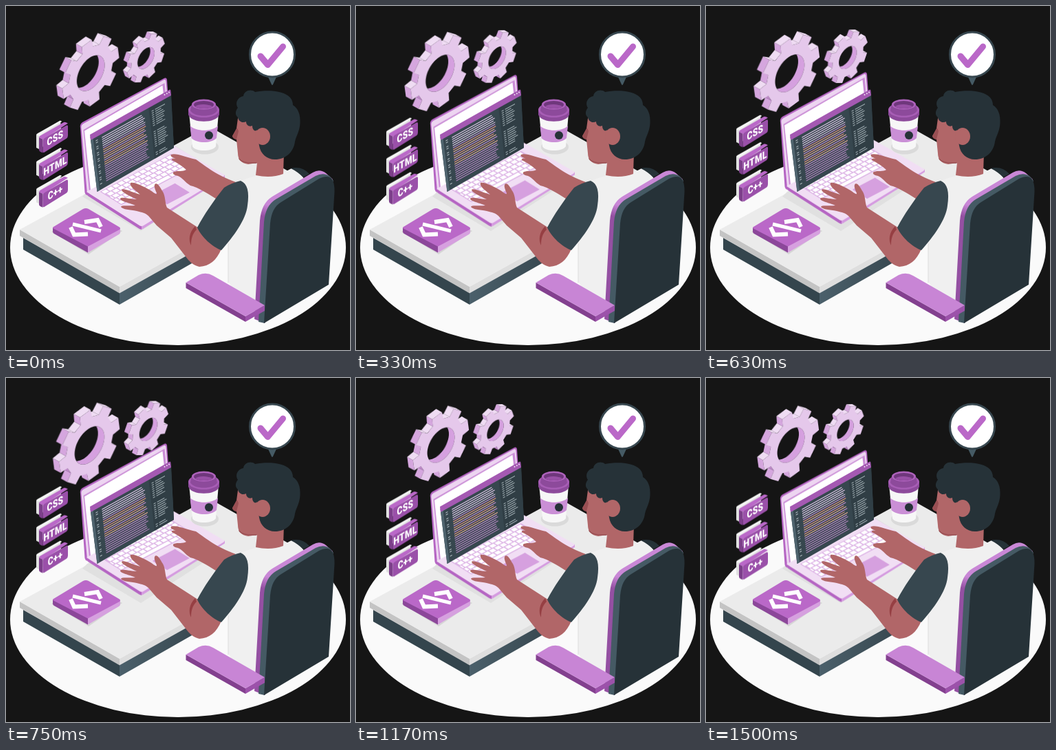
These frames come from a looping animation (500x500 px, 1.54 s). An HTML page:

```html
<!DOCTYPE html>
<html lang="en">
<head>
<meta charset="utf-8">
<title>Coding at a desk</title>
<style>
  html, body { margin: 0; width: 100%; height: 100%; overflow: hidden; background: #151515; }
  svg { display: block; width: 100%; height: 100%; }
  .float { animation: float 1540ms linear -40ms infinite; }
  .pulse { animation: pulse 1540ms linear -40ms infinite; transform-origin: 150px 92.5px; }
  @keyframes float {
    0%, 100% { transform: translateY(.5px); }
    50% { transform: translateY(-9.5px); }
  }
  @keyframes pulse {
    0%, 32.5%, 65%, 100% { transform: scale(1); }
    16.2%, 48.7% { transform: scale(1.1); }
  }
  .tag text { font: 900 14px Roboto, Arial, sans-serif; fill: #fff; text-anchor: middle; letter-spacing: .3px; }
  .skin { fill: #b16668; }
  .line { fill: none; stroke-linecap: round; stroke-linejoin: round; }
</style>
</head>
<body>
<svg viewBox="0 0 500 500">
  <defs>
    <linearGradient id="rim" gradientUnits="userSpaceOnUse" x1="372" y1="320" x2="390" y2="278">
      <stop offset=".3" stop-color="#9450a2"/><stop offset=".7" stop-color="#c987d6"/>
    </linearGradient>
    <linearGradient id="drawer" gradientUnits="userSpaceOnUse" x1="165" y1="0" x2="280" y2="0">
      <stop offset="0" stop-color="#4b606b"/><stop offset="1" stop-color="#37474f"/>
    </linearGradient>
    <g id="plate">
      <path fill="#e0e0e0" d="M44 188Q44 186 46 185L79 166.500L81 187L48 208L44 206Z"/>
      <path fill="#f5f5f5" d="M44 187L78 167Q80 166 81 168L48 189Z"/>
      <path fill="#7d3f8b" d="M48 191L53.500 193.500V213.500L50 212Q48 211 48 209Z"/>
      <path fill="#ba68c8" d="M48 191Q48 189.500 50 188.500L84 169Q86 168 90 170.500L54 194Z"/>
      <path fill="#9a50a9" d="M53.500 196Q53.500 193.500 56 192L87 174Q90 172 90 175V188Q90 191 88 192.500L56 212.500Q53.500 214 53.500 211Z"/>
    </g>
  </defs>

  <rect width="500" height="500" fill="#151515"/>
  <ellipse cx="250" cy="351" rx="244" ry="142" fill="#fafafa"/>

  <g id="gears" class="pulse"></g>

  <!-- desk -->
  <path fill="#34454d" d="M25 337L165 416V434L25 354Z"/>
  <path fill="url(#drawer)" d="M165 416L300 340V357L165 434Z"/>
  <path fill="#c4c4c4" d="M20 325L165 408V417.500L20 334Z"/>
  <path fill="#dedede" d="M165 408L300 333V342L165 417.500Z"/>
  <path fill="#ebebeb" d="M20 325L295 175L428 250L340 311L165 408Z"/>

  <!-- code block -->
  <path fill="#d6d6d6" d="M66 328L115 299L169 327L120 361Z"/>
  <path fill="#8c479a" d="M68 322L119 349V358.500L70 331Q68 330 68 328Z"/>
  <path fill="#d6a0df" d="M119 349L166 323V329Q166 331 164 332L119 358.500Z"/>
  <path fill="#ba68c8" d="M69 321L112 295Q116 293 120 295L165 321.500Q167 323 165 325L119 349.500L69 323.500Q67 322 69 321Z"/>
  <g class="line" stroke="#fff" stroke-width="6" style="stroke-linecap:butt;stroke-linejoin:miter">
    <path d="M114 314L133 311L138 321M119 331.500L99 332.500L94 321.500"/>
    <path d="M97 317L138 327" stroke-width="5"/>
  </g>

  <!-- laptop -->
  <path fill="#e0e0e0" d="M111 277L118 270L246 203L317 249L196 327Z"/>
  <g class="float">
    <path fill="#b565c3" d="M108 177Q107 172 111 169L229 105.500Q233 103 234 107L241 205L118 275Q115 274 114.500 271Z"/>
    <path fill="#edd5f1" d="M109.500 177Q109 173 112.500 171L229 107.500Q232 106 232.500 109L240 204L118 272Z"/>
    <path fill="#ca8cd6" d="M112.500 180L230.500 112L239 204L121 270Z"/>
    <path fill="#fff" d="M114 181.500L227.500 115.500L237 203L123 268Z"/>
    <path fill="#b565c3" d="M117 270L197 319V325L194 324L119 276Q117 274 117 270Z"/>
    <path fill="#d59be0" d="M197 319L318 245.500V249.500L199 324L197 325Z"/>
    <path fill="#f1def4" d="M117 270L241 204L244 203L316 244.500Q319 246 316 248L200 319Q197 321 194 319Z"/>
    <g id="deck" transform="matrix(1.26 -.67 .79 .49 118 270)">
      <path fill="#dcb2e5" d="M8 11H90V50H8Z"/>
      <path fill="#d6a0df" d="M37 61H63V88H37Z"/>
    </g>
  </g>

  <!-- editor window -->
  <path fill="#37474f" d="M122.500 190L239.500 125L244 206L132.500 270Z"/>
  <path fill="#303e45" d="M207 146L240 127L244 206L216 222Z"/>
  <path fill="#50656f" d="M123 194L126.500 192L136 268L132.500 270Z"/>
  <path fill="#a459b2" d="M122 187L237 122Q239.500 120.500 239.500 124L240 130L123 195Z"/>
  <g fill="#f3e3f6"><circle cx="230.500" cy="129" r="1"/><circle cx="233.800" cy="127.200" r="1"/><circle cx="237" cy="125.400" r="1"/></g>
  <g id="code" transform="matrix(1 -.556 .1 1 122 186)"></g>

  <!-- cup -->
  <ellipse cx="289" cy="205" rx="20" ry="10.500" fill="#dadada"/>
  <path fill="#f7f7f7" d="M266 155L271 204C275 212 300 212 305 204L309 155Z"/>
  <path fill="#ca8fd6" d="M267.500 174C276 183 300 183 308 174L306 192C298 200 278 200 269.500 192Z"/>
  <circle cx="295" cy="188" r="6" fill="#263238"/>
  <path fill="#8d4a9b" d="M265 150V158C269 171 306 171 310 158V150Z"/>
  <ellipse cx="287.500" cy="151" rx="22.500" ry="11" fill="#a75db5"/>
  <path fill="#8d4a9b" d="M270 143L268 152C273 162 302 162 307 152L305 143Z"/>
  <ellipse cx="287.500" cy="143" rx="17.500" ry="7.500" fill="#ae62bc"/>
  <ellipse cx="287.500" cy="143.500" rx="14.500" ry="5.500" fill="#6f377c"/>
  <path fill="#9850a6" d="M275 146C280 141 296 143 300 146C295 150 281 150 275 146Z"/>

  <!-- man -->
  <path class="skin" d="M240 216C246 213 262 220 276 223C288 231 302 244 334 256L320 266L305 280C292 272 280 264 268 261C260 256 257 250 250 247C244 246 241 243 244 241C250 239 257 241 262 238C255 232 249 228 241 224C240 222 243 221 247 222C243 220 238 219 240 216Z"/>
  <path fill="#f0f0f0" d="M341 255C352 249 362 248 366 245L402 243L415 236Q426 240 434 252L395 300L372 440L340 430L323 400V340Z"/>
  <path fill="#263238" d="M414 236Q430 232 441 244L432 249Q424 241 414 236Z"/>
  <path class="line" stroke="#dcdcdc" d="M323 345V402"/>
  <path class="skin" d="M338 156L335 178L329 189Q330 193 335 194L337 214Q337 228 352 230L365 228L363 246Q385 251 403 244L404 212L374 155Z"/>
  <path fill="#984f53" d="M336 177L329 189Q330 193 335 194L338 182Z"/>
  <path class="line" stroke="#984f53" stroke-width="1.500" d="M339 222Q343 229 364 228"/>
  <path fill="#263238" d="M337 162C332 158 334 151 337 148C332 140 338 132 345 131C346 123 356 120 362 125C378 122 403 122 413 133Q417 138 417 144C425 149 428 158 427.500 170C427 182 422 188 420 197C418 213 406 223 391 223C379 223 370 215 368 203L365 180C363 183 358 181 358 174C353 176 349 173 349 168C343 171 338 167 337 162Z"/>
  <ellipse cx="373" cy="189.500" rx="11" ry="12.500" class="skin"/>
  <path class="skin" d="M181 257C186 255 200 262 210 268C216 272 219 275 219 272C217 267 214 261 217 258.500C221 257 224 264 228 270C232 277 231 287 234 293L279 322L313 353C306 370 296 378 281 379C272 377 266 371 261 364L240 337L219 319L207 305C203 301 198 300 190 298C180 296 170 296 167 292C168 289 177 291 188 290C180 286 166 284 166 280C167 277 177 280 190 281C180 276 168 271 168 267C170 264 182 270 195 274C188 268 179 262 181 257Z"/>
  <path fill="#963f43" d="M275 320C266 329 265 340 269 348C269 338 271 331 277 325Z"/>
  <path fill="#37474f" d="M341 254C351 258 354 270 351 290C349 310 331 335 313 355C300 350 284 336 278 322C288 303 301 284 317 264Q328 257 341 254Z"/>

  <!-- chair -->
  <path fill="url(#rim)" d="M361 455L369 312Q371 287 387 277L446 242Q456 236 465 243L475 252L376 461Z"/>
  <path fill="#455a64" d="M367 459L375 314Q377 290 392 281L450 247Q462 241 471 248L476 254L376 461Z"/>
  <path fill="#263238" d="M375 461L384 316Q386 293 400 285L455 251Q478 240 477.500 270L469 405Z"/>
  <path fill="#83408f" d="M261.500 402L348 451V459L261.500 410Z"/>
  <path fill="#9c52aa" d="M348 451L376 435V443L348 459Z"/>
  <path fill="#c885d5" d="M261.500 402L280 391Q291 386 301 392L376 435L348 451Z"/>

  <!-- speech bubble -->
  <path fill="#455a64" d="M379.500 100L385.500 113Q387 117 388.500 113L394.500 100Z"/>
  <circle cx="387" cy="70.500" r="32.500" fill="#fff" stroke="#37474f" stroke-width="3"/>
  <path class="line" stroke="#ba68c8" stroke-width="9" d="M370 73L380.500 85.500L402.500 59"/>

  <!-- language tags -->
  <g class="float tag">
    <use href="#plate"/><use href="#plate" y="39.700"/><use href="#plate" y="79.400"/>
    <text transform="matrix(.866 -.49 0 1.100 71.500 197)">CSS</text>
    <text transform="matrix(.866 -.49 0 1.100 71.500 237.500)">HTML</text>
    <text transform="matrix(.866 -.49 0 1.100 71.500 276.500)">C++</text>
  </g>
</svg>
<script>
  const $ = id => document.getElementById(id);
  function add(parent, tag, attrs) {
    const el = document.createElementNS('http://www.w3.org/2000/svg', tag);
    for (const k in attrs) el.setAttribute(k, attrs[k]);
    parent.append(el);
  }
  const poly = pts => 'M' + pts.map(p => p.map(n => n.toFixed(2))).join('L') + 'Z';

  // Extruded eight-tooth gear standing in an isometric plane
  function gear(cx, cy, r, hole, phase, dx, dy) {
    const at = (rad, deg) => {
      const a = deg * Math.PI / 180, c = rad * Math.cos(a);
      return [cx + .866 * c, cy - .5 * c + rad * Math.sin(a)];
    };
    const shift = p => [p[0] + dx, p[1] + dy];
    const ring = Array.from({ length: 60 }, (_, i) => at(hole, i * 6));
    const rim = [];
    for (let k = 0; k < 8; k++)
      for (const [s, d] of [[.78, -14], [1, -10], [1, 10], [.78, 14]])
        rim.push(at(r * s, phase + 45 * k + d));
    const g = $('gears');
    rim.forEach((p, i) => {
      const q = rim[(i + 1) % rim.length];
      const nx = q[1] - p[1], ny = p[0] - q[0];
      if (nx * dx + ny * dy <= 0) return;
      const up = -ny / Math.hypot(nx, ny);
      const fill = up > .45 ? '#efdcf3' : up > -.35 ? '#d5a6de' : '#c08acb';
      add(g, 'path', { d: poly([p, q, shift(q), shift(p)]), fill });
    });
    add(g, 'path', { d: poly(ring), fill: '#d5a0df' });
    add(g, 'path', { d: poly(ring.map(shift)), fill: '#151515' });
    add(g, 'path', { d: poly(rim) + poly(ring), fill: '#e5c8eb', 'fill-rule': 'evenodd' });
  }
  gear(123.5, 97.5, 47, 23, -8, -8.5, -4.7);
  gear(202.5, 76, 31.5, 14, -19, -6, -3.3);

  // Keyboard rows
  for (let i = 0; i < 5; i++)
    add($('deck'), 'path', {
      d: `M9 ${15 + i * 7.6}H89`, stroke: '#fff', 'stroke-width': 6,
      'stroke-dasharray': i == 4 ? '8 1.2 8 1.2 34 1.2' : '5 1.2', 'stroke-dashoffset': -i * 1.3
    });

  // Lines of code
  let seed = 7;
  const rnd = () => (seed = seed * 16807 % 2147483647) / 2147483647;
  const bar = (x, y, w, stroke) =>
    add($('code'), 'path', { d: `M${x} ${y}h${w}`, stroke, 'stroke-width': 1.2 });
  for (let i = 0; i < 22; i++) {
    const y = 14 + i * 3;
    const tint = i < 5 ? '#dcc6e4' : i < 15 ? ['#e0937f', '#dfa994', '#c08fcd'][i % 3] : '#b184be';
    if (i % 3 < 2) bar(7, y, 3, '#a9b4ba');
    bar(16, y, 58 + rnd() * 5, tint);
    if (i % 10 < 8) {
      bar(88, y + 2, 3, '#98a5ab');
      bar(93, y + 2, 7 + rnd() * 8, '#98a5ab');
    }
  }
</script>
</body>
</html>
```
